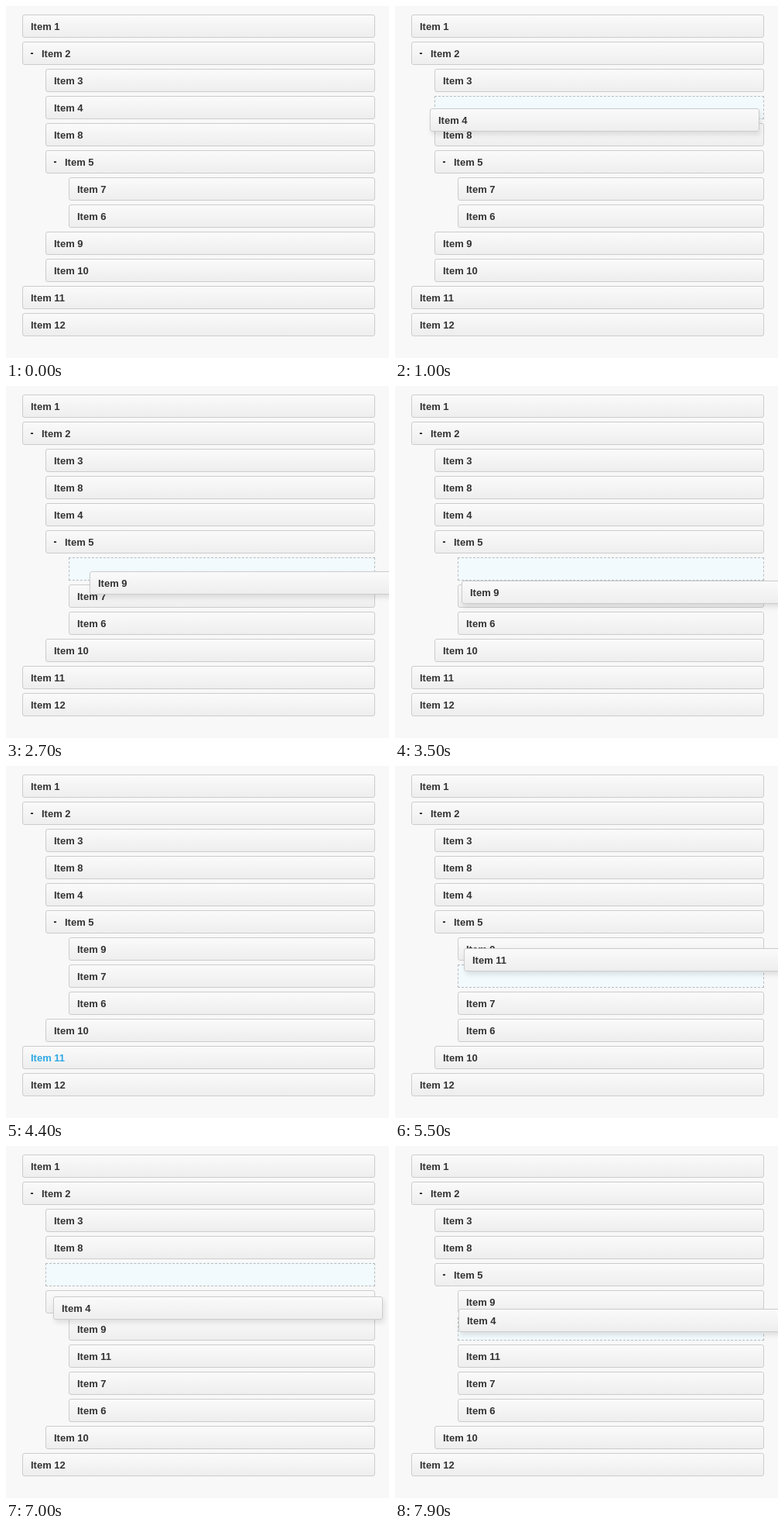
Write an HTML page that moves like this. It is 495 by 454 pixels and loops after 8000 ms.

```html
<!DOCTYPE html>
<html lang="en">
<head>
<meta charset="utf-8">
<title>Nested sortable list</title>
<style>
html, body {
  margin: 0;
  width: 100%;
  height: 100%;
  overflow: hidden;
  background: #f8f8f8;
}
body { position: relative; }
.row {
  position: absolute;
  left: 0;
  top: 0;
  height: 30px;
  box-sizing: border-box;
  padding: 5px 10px;
  border: 1px solid #ccc;
  border-radius: 3px;
  background: linear-gradient(#fafafa, #eee);
  color: #333;
  font: bold 13px/20px "Liberation Sans", Arial, sans-serif;
  white-space: nowrap;
}
.parent { padding-left: 24px; }
.parent::before {
  content: "-";
  position: absolute;
  left: -1px;
  top: 8px;
  width: 25px;
  text-align: center;
  font-size: 12px;
  line-height: 12px;
  color: #000;
}
.hover { color: #2ea8e5; }
.flat { background: #fafafa; }
.slot {
  border: 1px dashed #b6bcbf;
  border-radius: 0;
  background: #f2fafe;
  color: transparent;
}
#drag { z-index: 2; box-shadow: 2px 4px 6px rgba(0, 0, 0, .1); }
</style>
</head>
<body>
<script>
const LOOP = 8000, STEP = 100;

// [item, depth] from top to bottom
const start = [[1, 0], [2, 0], [3, 1], [4, 1], [8, 1], [5, 1], [7, 2], [6, 2],
  [9, 1], [10, 1], [11, 0], [12, 0]];

// [time, item, item above its new place, new depth]
const moves = [
  [1300, 4, 8, 1],
  [2400, 9, 7, 2], [2600, 9, 5, 2],
  [5200, 11, 10, 1], [5300, 11, 7, 2], [5400, 11, 9, 2],
  [7300, 4, 5, 2], [7700, 4, 9, 2]
];

// [time, item under the pointer]
const hovers = [
  [0, 0], [100, 4], [200, 8], [400, 4], [700, 0],
  [1600, 4], [1800, 5], [1900, 7], [2000, 9], [2200, 0],
  [4000, 9], [4300, 10], [4400, 11], [5100, 0],
  [6000, 11], [6200, 9], [6300, 5], [6400, 4], [6800, 0]
];

// [item, from, to] with the plain background
const flats = [[4, 100, 700], [4, 1600, 1800], [11, 4600, 5100], [11, 6100, 6200], [4, 6500, 6800]];

// path points are [time, x, y]
const drags = [
  { id: 4, width: 426, end: 1600, path: [[700, 51, 117], [900, 46, 125], [1100, 44, 138],
    [1300, 47, 154], [1400, 50, 160], [1500, 51, 160]] },
  { id: 9, width: 426, end: 4000, path: [[2200, 52, 291], [2300, 63, 276], [2400, 82, 250],
    [2500, 98, 229], [2600, 108, 222], [2700, 108, 239], [3000, 104, 237], [3300, 90, 247],
    [3500, 86, 251], [3700, 88, 241], [3900, 91, 228]] },
  { id: 11, width: 456, end: 6000, path: [[5100, 22, 360], [5200, 36, 335], [5300, 62, 290],
    [5400, 82, 250], [5500, 89, 235], [5600, 89, 233], [5900, 86, 251]] },
  { id: 4, width: 426, end: LOOP, path: [[6800, 52, 153], [6900, 55, 172], [7000, 61, 194],
    [7300, 75, 209], [7600, 84, 213], [7700, 85, 234], [7800, 84, 226], [7900, 82, 210]] }
];

const makeRow = () => document.body.appendChild(document.createElement("div"));
const rows = {};
for (const [id] of start) {
  rows[id] = makeRow();
  rows[id].textContent = "Item " + id;
}
const dragBox = makeRow();
dragBox.id = "drag";
dragBox.className = "row";

function place(el, x, y, width) {
  el.style.transform = `translate(${x}px, ${y}px)`;
  el.style.width = width + "px";
}

function orderAt(t) {
  const list = start.slice();
  for (const [time, id, above, depth] of moves) {
    if (time > t) break;
    list.splice(list.findIndex(r => r[0] === id), 1);
    list.splice(list.findIndex(r => r[0] === above) + 1, 0, [id, depth]);
  }
  return list;
}

function pointAt(path, t) {
  const i = path.findIndex(p => p[0] > t);
  if (i < 0) return path[path.length - 1].slice(1);
  const [t0, x0, y0] = path[i - 1], [t1, x1, y1] = path[i];
  const k = (t - t0) / (t1 - t0);
  return [Math.round(x0 + (x1 - x0) * k), Math.round(y0 + (y1 - y0) * k)];
}

function render(t) {
  const drag = drags.find(d => t >= d.path[0][0] && t < d.end);
  const hover = hovers.filter(h => h[0] <= t).pop()[1];
  orderAt(t).forEach(([id, depth], i) => {
    const el = rows[id], x = 21 + 30 * depth;
    const flat = flats.some(([f, from, to]) => f === id && t >= from && t < to);
    el.className = "row" + (id === 2 || id === 5 ? " parent" : "") +
      (id === hover ? " hover" : "") + (flat ? " flat" : "") +
      (drag && drag.id === id ? " slot" : "");
    place(el, x, 11 + 35 * i, 477 - x);
  });
  dragBox.hidden = !drag;
  if (drag) {
    dragBox.textContent = "Item " + drag.id;
    place(dragBox, ...pointAt(drag.path, t), drag.width);
  }
}

let last = -1;
function tick() {
  const t = Math.floor(performance.now() % LOOP / STEP) * STEP;
  if (t !== last) render(last = t);
  requestAnimationFrame(tick);
}
tick();
</script>
</body>
</html>
```
